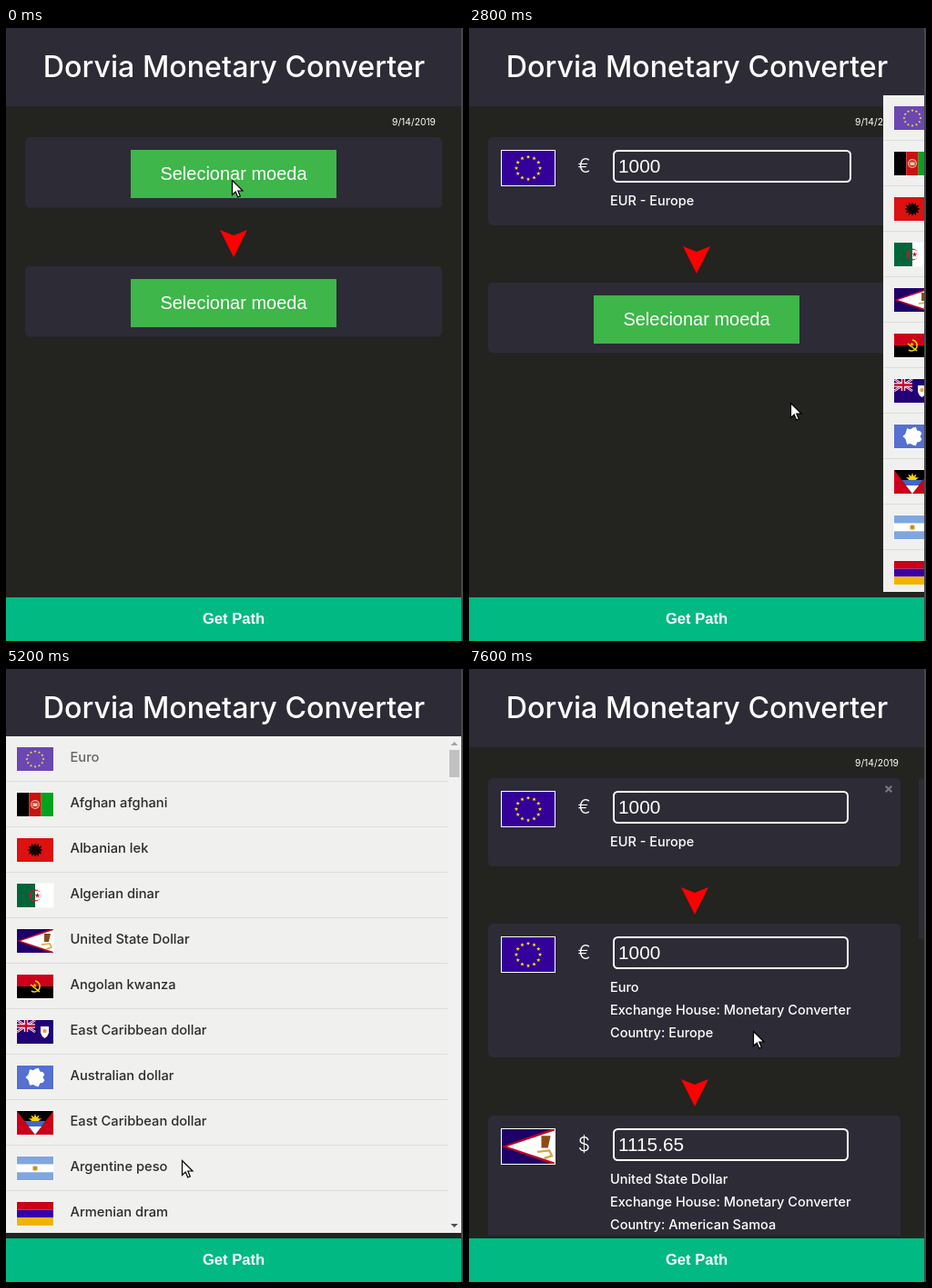
Write an HTML page that moves like this. It is 502x674 px and loops after 8000 ms.

```html
<!DOCTYPE html>
<html lang="en">
<head>
<meta charset="utf-8">
<title>Dorvia Monetary Converter</title>
<style>
html, body { margin: 0; width: 100%; height: 100%; overflow: hidden; background: #232320; }
svg { display: block; }
text { font: 500 14.5px Inter, "Open Sans", sans-serif; fill: #fff; }
.title { font-size: 32.2px; }
.date { font-size: 10.3px; font-weight: 400; }
.sign { font-size: 21px; font-weight: 300; }
.row { font-size: 14.7px; fill: #2b2b2b; }
.ui { font: 20px "Liberation Sans", Arial, sans-serif; }
.value { font-size: 20.8px; }
.go { font-size: 16.6px; font-weight: 700; }
</style>
</head>
<body>
<svg id="stage" width="502" height="674" viewBox="0 0 502 674"></svg>
<script>
const LOOP = 8000, TICK = 200;
const PANEL = '#2d2b35';

const rect = (x, y, w, h, fill, more = '') =>
  `<rect x="${x}" y="${y}" width="${w}" height="${h}" fill="${fill}" ${more}/>`;
const path = (d, fill, more = '') => `<path d="${d}" fill="${fill}" ${more}/>`;
const disc = (x, y, r, fill) => `<circle cx="${x}" cy="${y}" r="${r}" fill="${fill}"/>`;
const line = (d, color, width) => path(d, 'none', `stroke="${color}" stroke-width="${width}"`);
const text = (x, y, s, cls = '', anchor = 'start') =>
  `<text x="${x}" y="${y}" class="${cls}" text-anchor="${anchor}">${s}</text>`;

// Closed outline whose radius is a function of the angle index
function ring(x, y, n, radius, fill) {
  const points = Array.from({ length: n }, (_, i) => {
    const a = i * 2 * Math.PI / n - Math.PI / 2, r = radius(i, a);
    return (x + r * Math.cos(a)).toFixed(2) + ' ' + (y + r * Math.sin(a)).toFixed(2);
  });
  return path(`M${points.join('L')}Z`, fill);
}
const star = (x, y, n, outer, inner, fill) => ring(x, y, 2 * n, i => i % 2 ? inner : outer, fill);

// Flags on a 40 by 26 field
const field = color => rect(0, 0, 40, 26, color);
const rowsOf = (...colors) =>
  colors.map((c, i, all) => rect(0, i * 26 / all.length, 40, 26 / all.length, c)).join('');
const colsOf = (...colors) =>
  colors.map((c, i, all) => rect(i * 40 / all.length, 0, 40 / all.length, 26, c)).join('');
const circleOfStars = Array.from({ length: 12 }, (_, i) =>
  star(20 + 9 * Math.sin(i * Math.PI / 6), 13 - 8.4 * Math.cos(i * Math.PI / 6), 5, 1.6, .65, '#ffe600')).join('');
const saltire = 'M0 0L20 13M20 0L0 13', cross = 'M10 0V13M0 6.5H20';

const flags = {
  eu: field('#330099') + circleOfStars,
  af: colsOf('#000', '#cc1010', '#00a31e') + disc(20, 13, 5, '#e9b29a') + disc(20, 13, 3.8, '#c92a1e') +
    rect(17.5, 11.5, 5, 3.5, '#f0c8aa'),
  al: field('#dd1111') + ring(20, 13, 24, (i, a) => (i % 2 ? 5 : 7.5) + Math.abs(Math.cos(a)), '#160000'),
  dz: colsOf('#00663a', '#fff') + disc(20, 13, 6.5, '#d4102c') + disc(21.5, 13, 5.2, '#fff') +
    rect(16, 8, 4, 10, '#00663a') + star(22.5, 13, 5, 3, 1.2, '#d4102c'),
  as: field('#1e0068') + path('M0 13L40-1V27Z', '#c00020') + path('M4 13L40 1V25Z', '#fff') +
    path('M30 5h7l-2 9h-5z', '#8b4a16') + line('M27 17l9-1 2 4-6 2', '#d9a441', 1.6),
  ao: rowsOf('#cc0018', '#000') + line('M20 7a6 6 0 1 1-4 11M15 11l10 8', '#ffdf00', 1.5) +
    star(19.5, 12, 5, 2.4, 1, '#ffdf00'),
  ai: field('#210078') + line(saltire, '#fff', 2.6) + line(saltire, '#cc0028', 1) +
    line(cross, '#fff', 4.4) + line(cross, '#cc0028', 2.4) +
    path('M26 7h9v7q-1 4-4.5 6-3.5-2-4.5-6z', '#fff') + disc(30.5, 12, 2.2, '#e6a04c'),
  aq: field('#5470d0') + ring(20.5, 13, 20, i => 9.5 + 1.5 * Math.sin(i * 2.2), '#fff'),
  ag: field('#cc0018') + path('M0 0H40L20 26Z', '#000') + star(20, 10.5, 10, 7.5, 4, '#ffd200') +
    path('M8.5 11H31.500L20 26Z', '#4068c8') + path('M13 17H27L20 26Z', '#fff'),
  ar: rowsOf('#80a6e0', '#fff', '#80a6e0') + star(20, 13, 12, 3.6, 2.3, '#dca62c') + disc(20, 13, 1.7, '#bd8a20'),
  am: rowsOf('#cc0018', '#3a00a8', '#f0b400')
};
const flag = (id, x, y, w, h) =>
  `<svg x="${x}" y="${y}" width="${w}" height="${h}" viewBox="0 0 40 26" preserveAspectRatio="none">${flags[id]}</svg>`;

const panel = (y, h, w = 458) => rect(21, y, w, h, PANEL, 'rx="5"');
const arrow = (x, y) => path(`M${x - 15} ${y}l15 6 15-6-15 30z`, '#f00');
const closeMark = (x, y) => line(`M${x - 3.3} ${y - 3.3}l6.6 6.6m0-6.6l-6.6 6.6`, '#77767b', 2.2);

const picker = y => panel(y, 77.5) + rect(137, y + 14, 226, 53, '#3eb649') +
  text(250, y + 47, 'Selecionar moeda', 'ui', 'middle');

function entry(y, w, id, sign, value, lines, closable) {
  return panel(y, 72 + 25 * lines.length, w) +
    rect(35, y + 14, 60, 40, '#fff') + flag(id, 36, y + 15, 58, 38) +
    text(126.5, y + 39, sign, 'sign', 'middle') +
    rect(159, y + 15, w === 458 ? 260 : 257, 34, 'none', 'rx="4.5" stroke="#fff" stroke-width="2"') +
    text(164, y + 39, value, 'ui value') +
    lines.map((s, i) => text(155, y + 75 + 25 * i, s)).join('') +
    (closable ? closeMark(w + 8, y + 12) : '');
}

const euroEntry = w => entry(120, w, 'eu', '€', '1000', ['EUR - Europe'], true);
const result = (y, id, sign, value, name, country) => arrow(248, y - 40) +
  entry(y, 453, id, sign, value, [name, 'Exchange House: Monetary Converter', 'Country: ' + country]);
const scenes = {
  start: picker(120) + arrow(250, 222) + picker(262),
  pick: euroEntry(458) + arrow(250, 240) + picker(280),
  both: euroEntry(458) + arrow(250, 240) + entry(280, 458, 'ar', '$', '', ['ARS - Argentina'], true),
  route: euroEntry(453) + result(280, 'eu', '€', '1000', 'Euro', 'Europe') +
    result(491, 'as', '$', '1115.65', 'United State Dollar', 'American Samoa') +
    rect(494, 120, 6, 177, PANEL, 'rx="2"')
};

const currencies = {
  eu: 'Euro', af: 'Afghan afghani', al: 'Albanian lek', dz: 'Algerian dinar',
  as: 'United State Dollar', ao: 'Angolan kwanza', ai: 'East Caribbean dollar',
  aq: 'Australian dollar', ag: 'East Caribbean dollar', ar: 'Argentine peso', am: 'Armenian dram'
};
const rows = Object.entries(currencies).map(([id, name], i) => {
  const y = 74 + 50 * i;
  return (i ? rect(0, y - 1, 485, 1, '#dcdcda') : '') + `<g id="row-${id}">` +
    rect(11.5, y + 11.5, 41, 27, '#fff') + flag(id, 12, y + 12, 40, 26) +
    text(70.5, y + 28, name, 'row') + '</g>';
}).join('');
const list = rect(0, 74, 500, 546, '#f0f0ee') + rect(485, 74, 15, 546, '#f1f1f1') + rows +
  rect(487, 89, 11, 30, '#c1c1c1') +
  path('M488.5 84l4-4 4 4z', '#a3a3a3') + path('M488.5 610l4 4 4-4z', '#505050');

const el = id => document.getElementById(id);
el('stage').innerHTML =
  '<clipPath id="body"><rect y="86" width="502" height="537"/></clipPath>' +
  rect(0, 0, 502, 674, '#232320') + rect(0, 0, 500, 86, PANEL) +
  text(250.5, 54, 'Dorvia Monetary Converter', 'title', 'middle') +
  text(472, 107, '9/14/2019', 'date', 'end') +
  '<g clip-path="url(#body)">' +
  Object.entries(scenes).map(([id, s]) => `<g id="${id}">${s}</g>`).join('') + '</g>' +
  `<g id="list">${list}</g>` +
  rect(0, 626, 500, 48, '#00b983') + text(250, 655, 'Get Path', 'ui go', 'middle') +
  rect(500, 0, 2, 674, '#48474b') +
  '<g id="cursor">' +
  path('M.5.5V16.5L4.2 13 6.7 19 9.3 17.9 6.8 12H12Z', '#fff', 'stroke="#000" stroke-width="1.2"') + '</g>';

const euroChosen = 2800, pesoChosen = 5600, routeFound = 6800;

// The list glides in and out along a bell curve
const bell = (t, width) => t < 0 ? 1 : Math.exp(-((t / width) ** 2));
const visit = (t, open, close) => t < close ? 1 - bell(t - open, 206) : bell(t - close, 129);
const listX = t => Math.round(500 * (1 - (t < 3200
  ? visit(t, 135, euroChosen - TICK) : visit(t, 3735, pesoChosen - TICK))));

// Cursor stops: time, x, y
const stops = [
  [0, 248, 167], [600, 249, 167], [1200, 259, 432], [2200, 110, 106], [2600, 110, 106],
  [2800, 353, 412], [3400, 300, 330], [4000, 303, 434], [5200, 193, 540], [5400, 193, 540],
  [6000, 245, 637], [6200, 245, 637], [6400, 252, 651], [6800, 387, 471], [7000, 387, 471], [7600, 312, 398]
];
function cursorAt(t) {
  const i = stops.findLastIndex(s => s[0] <= t);
  const [t0, x0, y0] = stops[i], [t1, x1, y1] = stops[i + 1] || [LOOP, x0, y0];
  const p = (t - t0) / (t1 - t0);
  return [x0 + (x1 - x0) * p, y0 + (y1 - y0) * p].map(Math.round);
}

const show = (node, on) => { node.style.display = on ? '' : 'none'; };
const place = (node, x, y) => node.setAttribute('transform', `translate(${x} ${y})`);

function draw() {
  const t = Math.floor(performance.now() % LOOP / TICK) * TICK;
  const scene = t < euroChosen ? 'start' : t < pesoChosen ? 'pick' : t < routeFound ? 'both' : 'route';
  for (const id in scenes) show(el(id), id === scene);
  place(el('list'), listX(t), 0);
  el('row-eu').style.opacity = t < euroChosen ? 1 : .7;
  place(el('cursor'), ...cursorAt(t));
  show(el('cursor'), t !== routeFound - TICK);
  requestAnimationFrame(draw);
}
draw();
</script>
</body>
</html>
```
